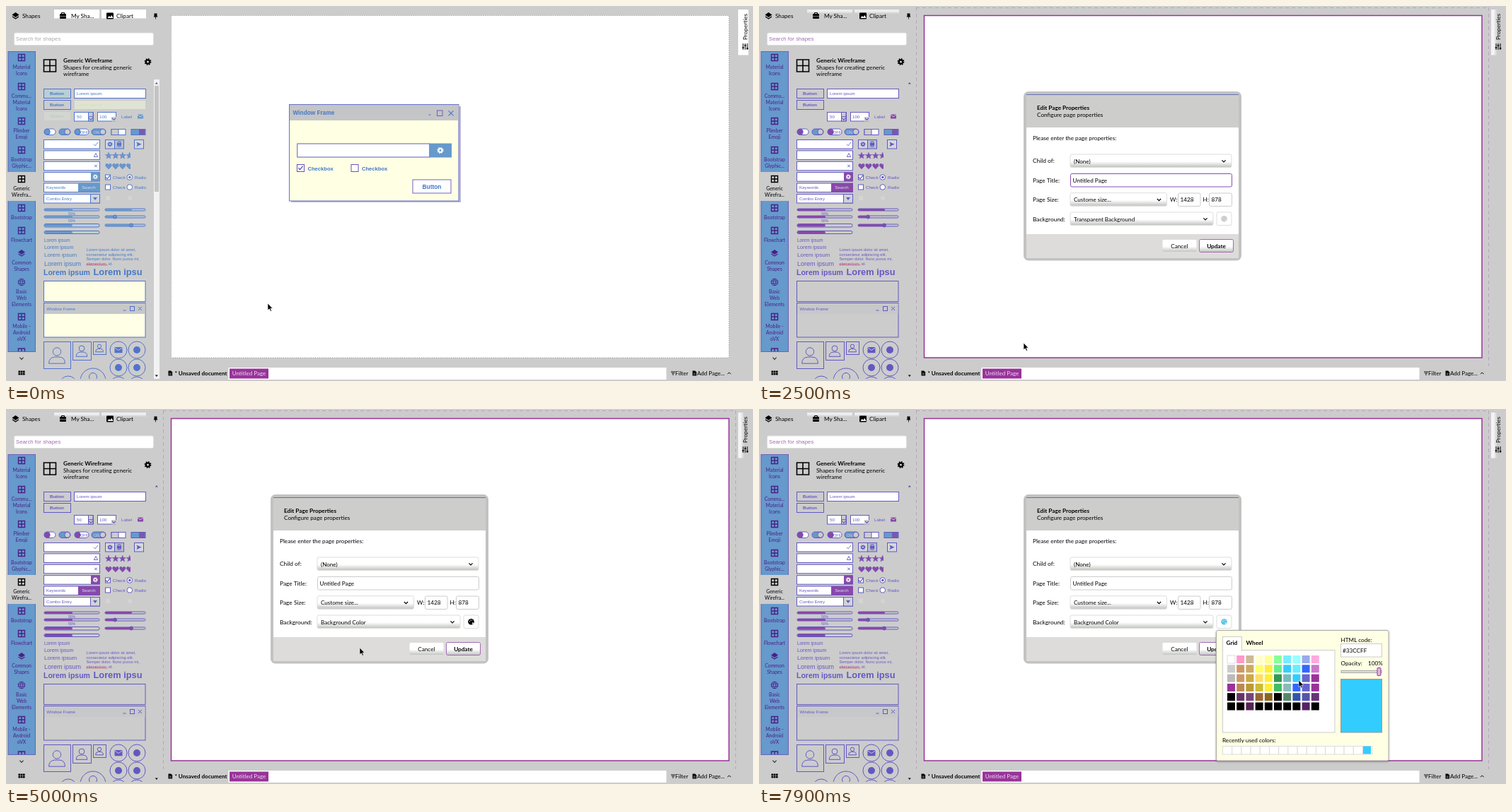
Write an HTML page that moves like this. It is 1056 px wide and 531 px high and loops after 8000 ms.

```html
<!DOCTYPE html>
<html lang="en">
<head>
<meta charset="utf-8">
<title>Page background settings</title>
<style>
html, body { margin: 0; width: 100%; height: 100%; overflow: hidden; background: #ccc; }
svg { display: block; width: 1056px; height: 531px; font-family: Lato, sans-serif;
  --line: #5272cc; --fill: #6699cc; --text: #4478c8; --paper: #ffffe6; --field: #fff;
  --hint: #aaa; --tab: #fff; --side: #fff; --strip: #3d2a90; --edge: #999; --soft: #b9cfd6; }
svg.modal { --line: #6258c2; --fill: #8848aa; --text: #6656c4; --paper: #ccc;
  --hint: #a06cb4; --tab: url(#tabFade); --side: url(#sideFade); --strip: #4c1f86; --edge: #993399; --soft: #ccc; }
text { white-space: pre; }
.arial { font-family: "Liberation Sans", Arial, sans-serif; }
.bold { font-weight: 700; }
.mid { text-anchor: middle; }
.hot rect { fill: #993399 !important; }
.hot text { fill: #e4ccf4 !important; }
</style>
</head>
<body>
<svg id="stage" viewBox="0 0 1056 531"></svg>
<script>
const stage = document.getElementById('stage');
const LINE = 'var(--line)', FILL = 'var(--fill)', TEXT = 'var(--text)', PURPLE = '#993399';

const paint = (fill, stroke, w = 1) => `style="fill:${fill};stroke:${stroke};stroke-width:${w}"`;
const rect = (x, y, w, h, fill = 'none', stroke = 'none', r = 0, more = '') =>
  `<rect x="${x}" y="${y}" width="${w}" height="${h}" rx="${r}" ${paint(fill, stroke)} ${more}/>`;
const path = (d, stroke = '#000', w = 1, fill = 'none', more = '') => `<path d="${d}" ${paint(fill, stroke, w)} ${more}/>`;
const circle = (x, y, r, fill = 'none', stroke = 'none', w = 1, more = '') =>
  `<circle cx="${x}" cy="${y}" r="${r}" ${paint(fill, stroke, w)} ${more}/>`;
const text = (x, y, s, fill = '#000', size = 8.2, cls = '') =>
  `<text x="${x}" y="${y}" class="${cls}" style="fill:${fill};font-size:${size}px">${s}</text>`;
const group = (id, body, more = '') => `<g id="${id}" ${more}>${body}</g>`;
const range = (n, f) => Array.from({ length: n }, (_, i) => f(i)).join('');

// Icons
const gear = (x, y, r, c) => {
  const tooth = r * .85 * Math.PI / 8;
  return circle(x, y, r * .55, 'none', c, r * .45) +
    circle(x, y, r * .85, 'none', c, r * .35, `stroke-dasharray="${tooth}"`);
};
const gridIcon = (x, y, r, c, w = 1) =>
  path(`M${x - r} ${y - r}h${2 * r}v${2 * r}h${-2 * r}zM${x} ${y - r}v${2 * r}M${x - r} ${y}h${2 * r}`, c, w);
const layers = (x, y, c) =>
  path(`M${x} ${y - 5}l5 3.5-5 3.5-5-3.5z`, 'none', 0, c) + path(`M${x - 4.5} ${y + 1}l4.5 3 4.5-3`, c, 1.3);
const globe = (x, y, c) => circle(x, y, 4.7, 'none', c) +
  path(`M${x - 4.5} ${y - 1.6}h9m0 3.2h-9M${x} ${y - 4.5}q-4 4.5 0 9q4-4.5 0-9`, c, .8);
const mail = (x, y, s, c) => rect(x - s, y - s * .75, 2 * s, 1.5 * s, c, 'none', .5) +
  path(`M${x - s} ${y - s * .6}l${s} ${s * .7} ${s}-${s * .7}`, '#ddd', .8);
const down = (x, y, c = '#000') => path(`M${x - 2.6} ${y - 1.3}l2.6 2.6 2.6-2.6`, c, 1.2);
const right = (x, y, c) => path(`M${x - 1.3} ${y - 2.6}l2.6 2.6-2.6 2.6`, c, 1.1);
const cross = (x, y, r, c, w = 1) => path(`M${x - r} ${y - r}l${2 * r} ${2 * r}m0 ${-2 * r}l${-2 * r} ${2 * r}`, c, w);
const check = (x, y, c, w = 1.2) => path(`M${x - 3} ${y}l2 2.4 4-5`, c, w);
const palette = (x, y, c) => circle(x, y, 4.3, c) +
  [[-2, -.6], [-.8, -2.3], [1.2, -2.2]].map(([a, b]) => circle(x + a, y + b, .7, '#ddd')).join('') + circle(x + 2.4, y + 2.2, 1.2, '#ddd');
const page = (x, y) => path(`M${x} ${y}h3.6l2 2v5h-5.6z`, 'none', 0, '#000') + path(`M${x + 1.2} ${y + 3.6}h3.2m-3.2 1.7h3.2`, '#ccc', .6);
const star = (x, y) => path('M' + Array.from({ length: 10 }, (_, i) => {
  const r = i % 2 ? 2 : 4.8, a = (i / 5 - .5) * Math.PI;
  return `${(x + r * Math.cos(a)).toFixed(1)} ${(y + r * Math.sin(a)).toFixed(1)}`;
}).join('L') + 'z', LINE, .5, FILL);
const heart = (x, y) => path(`M${x} ${y + 4}l-4-4.2c-1.3-4 3-4.6 4-1.6 1-3 5.3-2.4 4 1.6z`, LINE, .5, FILL);
const person = (x, y, s) => rect(x + .5, y + .5, s, s, 'none', LINE) +
  circle(x + s / 2, y + s * .38, s * .15, 'none', LINE) +
  path(`M${x + s * .2} ${y + s * .82}q0-${s * .22} ${s * .22}-${s * .24}h${s * .16}q${s * .22} 0 ${s * .22} ${s * .24}z`, LINE);

const small = (x, y, s, cls = '', size = 6.2, fill = TEXT) => text(x, y, s, fill, size, 'arial ' + cls);
const field = (x, y, w, h = 12.5, fill = 'var(--field)') => rect(x + .5, y + .5, w, h, fill, LINE);

function toolbar() {
  return rect(68, 5, 64, 12.5, 'var(--tab)') + rect(135, 5, 63, 12.5, 'var(--tab)') +
    layers(13.5, 14, '#000') + text(23, 17, 'Shapes') +
    rect(76, 11, 9, 7, '#000', 'none', 1) + path('M78.5 11v-1.5h4v1.5', '#000', 1) + path('M76 14.5h9', '#ccc', .6) + text(92, 17, 'My Sha...') +
    rect(142, 9.5, 10, 9, '#000', 'none', 1) + path('M143.5 17l2.3-3 1.6 1.7 2-2.7 2.2 4z', 'none', 0, '#fff') + text(156, 17, 'Clipart') +
    path('M209.5 10.5h4v3.5l1 1.5h-6l1-1.5z', 'none', 0, '#000') + path('M211.5 15v3.5', '#000', .8) +
    rect(11.5, 38, 197, 17.5, '#fff', '#ddd', 2) + text(14, 49, 'Search for shapes', 'var(--hint)', 7.8, 'arial');
}

function categories() {
  const items = [[73, 'Material', 'Icons'], [114, 'Commu...', 'Material', 'Icons'], [163, 'Plimber', 'Emoji'],
    [204, 'Bootstrap', 'Glyphic...'], [245, 'Generic', 'Wirefra...'], [286, 'Bootstrap'], [318, 'Flowchart'],
    [350, 'Common', 'Shapes'], [391, 'Basic', 'Web', 'Elements'], [440, 'Mobile -', 'Android', 'oVX']];
  return rect(3, 64.5, 38.5, 425, '#6699cc', '#6a62b8') + rect(2, 235, 41, 41, '#ccc') +
    items.map(([y, ...lines]) => {
      const c = y === 245 ? '#000' : 'var(--strip)';
      const icon = y === 350 ? layers(22, y, c) : y === 391 ? globe(22, y, c) : gridIcon(22, y, 4.5, c, 1.4);
      return icon + lines.map((s, i) => text(22, y + 16 + i * 9, s, c, 6.9, 'mid')).join('');
    }).join('') + path('M17.5 489v-4h9v4M22 485v4', 'var(--strip)', 1.4) +
    down(22, 499, '#333') + range(6, i => rect(17.5 + i % 3 * 3.2, 516.5 + (i > 2) * 3.2, 2.7, 2.7, '#000'));
}

function shapeList() {
  const pills = [[54, 0, ''], [75, 1, ''], [97, 0, 'OFF'], [121, 1, 'ON']].map(([x, on, s]) => {
    const w = s ? 20 : 16;
    return rect(x, 174, w, 8.5, on ? '#6699cc' : '#fff', LINE, 4.2) + circle(on ? x + w - 4.2 : x + 4.2, 178.2, 4, on ? '#ccc' : FILL, LINE) +
      (s ? small(on ? x + 3 : x + 8, 180.6, s, '', 5.6, on ? '#ccd' : TEXT) : '');
  }).join('');
  const slider = (x, y, w, part, knob) => rect(x, y - 1.5, w, 3, 'var(--soft)', LINE, 1.5) +
    rect(x, y - 1.5, part, 3, FILL, 'none', 1.5) + (knob ? circle(x + part, y, 2.5, FILL, LINE) : '');
  const para = ['Lorem ipsum dolor sit amet,', 'consectetur adipiscing elit.', 'Semper dolor. Nunc purus mi,'];
  return field(53, 117, 38, 13, 'var(--soft)') + small(72, 126, 'Button', 'mid bold') + field(96, 117, 101, 13) + small(100, 126, 'Lorem ipsum') +
    field(53, 133, 38, 13, '#ccc') + small(72, 142, 'Button', 'mid bold') +
    group('faint', rect(97, 134, 100, 12, '#e0e3d3') + small(100, 142, 'Lorem ipsum', '', 6.2, '#d8dcb8') +
      rect(54, 150, 37, 12, '#d2d6d0') + small(72, 158, 'Button', 'mid', 6.2, '#bcc4c4')) +
    field(96, 150, 27) + small(100, 158.5, '50') + rect(116.5, 150.5, 6.5, 12.5, '#ccc', LINE) + path('M116.5 156.7h6.5', LINE) +
    down(119.8, 160, LINE) + field(129, 150, 26) + small(132, 158.5, '100') + rect(149, 157, 7, 6.5, '#ccc') + down(152.5, 160, LINE) +
    small(163, 158.5, 'Label') + mail(190, 156.5, 4, FILL) +
    pills + rect(149, 174.5, 20, 8, '#fff', LINE) + rect(149, 174.5, 10, 8, '#ccc', LINE) + rect(177, 174.5, 20, 8, '#6699cc', LINE) + rect(188, 175, 8.5, 7, '#7a58b0') +
    range(4, i => field(53, 189 + i * 15.4, 79)) + check(127, 195.5, LINE, .8) + path('M127 208.5l2.7 5h-5.4z', LINE, .9) + cross(127, 226.5, 1.7, LINE) +
    rect(120, 235.5, 12.5, 12.5, FILL) + gear(126.3, 241.8, 3.5, '#eee') +
    [140, 153, 181].map(x => rect(x + .5, 189.5, 13, 12.5, x === 153 ? '#b5bccb' : '#d4d8dd', LINE)).join('') +
    gear(147, 195.7, 3.5, LINE) + rect(157, 194, 6, 3.5, LINE) + path('M158.3 194v-2h3.4v2m-3.4 3v2h3.4v-2', LINE) +
    path('M184.5 192.5l7 3.2-7 3.2 1.2-3.2z', 'none', 0, LINE) + circle(174, 195.7, 1, '#bfc4c4') +
    range(4, i => `<g ${i === 3 ? 'clip-path="url(#half)"' : ''}>${star(145 + i * 9.9, 212)}${heart(145 + i * 9.9, 227)}</g>`) +
    [242.5, 256.5].map((y, i) => rect(140.5, y - 3.5, 7, 7, '#fff', LINE) + (i ? '' : check(144, y, LINE)) + small(151, y + 2.5, 'Check') +
      circle(174.8, y, 3.8, '#fff', LINE) + (i ? '' : circle(174.8, y, 1.8, LINE)) + small(182, y + 2.5, 'Radio')).join('') +
    field(53, 250.5, 79) + small(57, 259, 'Keywords') + rect(102, 251, 31, 12.5, FILL) + small(117, 259, 'Search', 'mid', 6.2, '#dde') +
    field(53, 266, 79) + small(57, 274.5, 'Combo Entry') + rect(119.5, 266.5, 13, 12.5, '#d0d4d8', LINE) + path('M123 271h6l-3 4z', 'none', 0, LINE) +
    rect(141, 269, 6, 6, '#d3d5d3') + circle(175, 272, 3, '#d3d5d3') +
    slider(54, 288.5, 78, 40) + slider(54, 298.5, 78, 40) + small(93, 295.7, '50%', 'mid', 5) + small(93, 305.5, '50%', 'mid', 5) +
    rect(54, 308.5, 78, 4.5, 'var(--soft)', LINE, 2) + rect(54, 309, 40, 3.5, FILL, 'none', 2) +
    rect(54, 318.5, 78, 4, 'var(--soft)', LINE, 2) + rect(54, 319, 40, 3, FILL, 'none', 2) +
    slider(140, 288.5, 57, 38) + slider(140, 298.5, 57, 14, 1) + slider(140, 310.5, 57, 37, 1) +
    [[334, 6.3], [344, 7.2], [355, 8], [368, 9]].map(([y, s]) => small(54, y, 'Lorem ipsum', '', s)).join('') +
    small(53, 381, 'Lorem ipsum', 'bold', 10.5) + small(123.5, 381, 'Lorem ipsu', 'bold', 12.8) +
    para.map((s, i) => small(113.5, 347 + i * 6.5, s, '', 5.7)).join('') +
    small(113.5, 366.6, 'elementum', '', 5.7, '#a04a9a') + path('M113.5 366.8h30', '#c55', .7) + small(145, 366.6, 'id.', '', 5.7) +
    field(53, 389, 143.5, 29, 'var(--paper)') + field(53, 420, 143.5, 48.5, 'var(--paper)') + rect(54, 421, 142.5, 15, '#c6c8ca') +
    small(57.5, 431, 'Window Frame', '', 6) + path('M165.5 431h4', LINE) + rect(175.5, 425.5, 6, 6, 'none', LINE) + cross(189.5, 428.5, 2.5, LINE) +
    person(53, 475, 38) + person(94, 475, 26) + person(123, 475, 18) +
    [[159, 487], [185, 487], [159, 512], [185, 512], [159, 537], [185, 537]].map(([x, y]) => circle(x, y, 12, 'none', LINE)).join('') +
    mail(159, 487, 5.5, LINE) + circle(185, 487, 5, LINE) + circle(159, 512, 5, LINE) + circle(185, 512, 5, LINE) +
    circle(88, 536, 12, 'none', LINE) + circle(123, 531, 18, 'none', LINE) + circle(123, 525, 5.5, 'none', LINE);
}

function sidebar() {
  return toolbar() + categories() + gridIcon(62, 84.5, 8.5, '#000', 1.6) +
    text(81, 80, 'Generic Wireframe', '#000', 8.2, 'bold') + text(81, 89.5, 'Shapes for creating generic') + text(81, 99, 'wireframe') +
    gear(200.5, 79, 4.8, '#000') +
    group('scroll', rect(209, 104, 8, 424, '#f2f2f2') + rect(210, 113, 6, 150, '#c4c4c4')) +
    path('M210.8 110.5l2-2.5 2 2.5z', 'none', 0, '#5a4a9a') + path('M210.8 522.5h4l-2 2.5z', 'none', 0, '#000') +
    group('shapes', shapeList(), 'clip-path="url(#panel)"');
}

function workspace() {
  const box = x => rect(x + .5, 224.5, 10, 10, '#fff', '#6b4fc0');
  const frame = rect(403, 142, 240, 136, '#b9b5d8') + rect(400.5, 139.5, 239.5, 136.5, '#ffffe4', '#6673c8') +
    rect(401, 140, 238.5, 22, '#c4c5c6') + small(405.5, 154.3, 'Window Frame', 'bold', 8.3) +
    path('M597.5 154h3', LINE) + rect(609.5, 148, 7.5, 7.5, 'none', '#6b5fc0') + cross(629, 151.8, 3.5, LINE, 1.2) +
    rect(411.8, 195, 187, 19, '#fff', '#5b5fc4') + rect(598.5, 194.5, 31.5, 20, '#6699cc') + gear(614, 204.5, 4.5, '#fff') +
    box(411) + check(416.5, 229.3, '#5b5fc4', 1.4) + box(487.5) + small(426.5, 232.5, 'Checkbox', 'bold', 7.6) + small(503, 232.5, 'Checkbox', 'bold', 7.6) +
    rect(575, 246, 54, 19, '#fff', '#6f62c8') + small(602, 258.8, 'Button', 'mid bold', 8.4);
  return group('outer', path('M222.5 2V510M1031.5 2V510M222 2.5H1031', '#a98ab5', .6, 'none', 'stroke-dasharray="5 4"')) +
    rect(233.5, 13.5, 788.5, 484.5, '#fff', 'var(--edge)', 0, 'id="sheet"') + frame +
    rect(1035, 5, 14.5, 64.5, 'var(--side)') + `<g transform="rotate(-90)">${text(-48, 1047.5, 'Properties')}</g>` +
    path('M1042 53v9m3-9v9m3-9v9', '#000', 1) + path('M1040.7 59h2.6m.4-3h2.6m.4 4h2.6', '#000', 1.4) +
    page(229.5, 516.5) + text(238.5, 523, '* Unsaved document', '#000', 8, 'bold') +
    rect(314.5, 512, 619, 17, '#fff') + rect(316, 513.5, 55, 14, PURPLE) + text(319.7, 523, 'Untitled Page', '#ecdcf8', 8) +
    path('M940 518h6m-5 2h4m-3 2h2', '#000', .9) + text(946, 523, 'Filter', '#000', 8) +
    page(970.5, 516.5) + text(977, 523, 'Add Page...', '#000', 8) + path('M1020 521.2l2.3-2.3 2.3 2.3', '#000', 1);
}

const menuItems = [[369, 'New Child Page...'], [391, 'Duplicate'], [407, 'Delete'], [423, 'Move Left', 1], [439, 'Move Right', 1],
  [455, 'Goto'], [476.5, 'Properties...'], [491.5, 'Export page as PNG...'], [512, 'Edit Page Note...']];

function menu() {
  return rect(342, 359, 136, 164, '#fff', '#bbb', 1, 'filter="url(#shadow)"') +
    menuItems.map(([y, s, off]) => `<g class="item">${rect(344, y - 7.5, 131, 15, '#fff')}${text(364, y + 3, s, off ? '#bbb' : '#000')}` +
      (s[0] === 'E' && y < 500 ? text(448, y + 3, 'Ctrl+E') : '') + '</g>').join('') +
    path('M350 369h6.5M353.2 365.8v6.5', '#555', 1.2) + rect(351, 388, 6, 7.5, 'none', '#000', 1) + path('M349 393v-7h6', '#000') +
    path('M349.5 407h7.5', '#80307f', 1.4) + path('M354 420l-2.5 2.7 2.5 2.7', '#bbb') + right(353, 438.7, '#bbb') + right(465.5, 454.8, '#000');
}

function dialog() {
  const select = (y, w, s, id = '') => rect(440, y, w, 18.5, 'url(#button)', '#ddd', 2, id && `id="${id}"`) +
    text(445, y + 12.5, s, '#000', 8.1, id && id + 'Text') + down(440 + w - 11, y + 9.6);
  const input = (x, y, w, s, id = '') => rect(x + .5, y + .5, w, 18.5, '#fff', '#ccc', 2, id && `id="${id}"`) + text(x + 3.5, y + 12.5, s);
  return rect(374, 121, 308, 239.5, '#c2c2c2', 'none', 7) + rect(378, 125, 300, 232, '#fff') +
    rect(378, 125, 300, 47, '#cdcdcc') + path('M378 125.5h300', '#6670b8') + rect(378, 323, 300, 34, '#dedcda') +
    text(393, 147, 'Edit Page Properties', '#000', 8.2, 'bold') + text(393, 157, 'Configure page properties') +
    text(387, 190, 'Please enter the page properties:') +
    ['Child of:', 'Page Title:', 'Page Size:', 'Background:'].map((s, i) => text(387, 222 + i * 27.5, s, '#000', 8.4)).join('') +
    select(210, 228, '(None)') + input(440, 237, 228, 'Untitled Page', 'pageTitle') + select(264.7, 136.5, 'Custome size...') +
    text(581, 277, 'W:') + input(592, 264.5, 31.5, '1428') + text(627.5, 277, 'H:') + input(636, 264.5, 32, '878') +
    select(292, 202, 'Transparent Background', 'background') + rect(647, 292, 21, 18.5, '#fff', '#ddd', 2, 'id="pick"') +
    group('pickIcon', palette(657.5, 301.3, 'currentColor')) +
    rect(570, 330.5, 49, 18, 'url(#button)', '#ddd', 2) + text(594.3, 342.5, 'Cancel', '#000', 8.2, 'mid') +
    rect(622.5, 330.5, 48, 18, 'url(#button)', '#a06ab4', 2) + text(646.5, 342.5, 'Update', '#000', 8.2, 'mid bold');
}

function options() {
  return rect(439.5, 315.5, 103.5, 33.5, '#ffffe4', '#ccc', 1, 'filter="url(#shadow)"') +
    text(448, 327, 'Transparent Background') + text(448, 341.5, 'Background Color');
}

function colorPopup() {
  const swatches = ['fff f9c cb9 ffc ff9 8f9 7ef 9ff 9ae fad', 'ccc c96 ca6 ff6 fe3 6e8 3cf 6ef 36f c7c', 'bbb c96 ca4 fd6 fe3 395 7bb 3cf 66c 939',
    '939 b85 b93 cb3 fe3 4b6 8bb 36f 66c 939', '000 636 747 963 862 000 586 35a 55a 637', '000 000 525 000 000 000 000 000 526 000'];
  return rect(646.5, 313.5, 243.5, 184.5, '#ffffe4', '#aaa', 2, 'filter="url(#shadow)"') +
    rect(655.5, 341.5, 158.5, 116.5, '#fff', '#ccc') + rect(655.5, 322.5, 27, 20, '#fff', '#ccc') + rect(656, 340, 26, 4, '#fff') +
    text(660.5, 334, 'Grid', '#000', 8.2, 'bold') + text(688.5, 334, 'Wheel', '#000', 8.2, 'bold') +
    swatches.map((row, j) => row.split(' ').map((c, i) => rect(662 + i * 13.2, 349 + j * 13.3, 11, 11, '#' + c, c === 'fff' ? '#ddd' : 'none')).join('')).join('') +
    text(822.5, 330, 'HTML code:') + rect(822.5, 332.5, 58, 18.5, '#fff', '#ccc') + text(825, 345, '#FFFFFF', '#000', 8.2, 'code') +
    text(822.5, 363, 'Opacity:') + text(861, 363, '100%') + rect(823, 370.5, 57, 3, '#ddd', '#aaa') + rect(874, 366.5, 5, 11, '#ddb8dc', PURPLE, 1) +
    rect(822.5, 382.5, 58, 75.5, '#fff', '#999', 0, 'id="sample"') +
    text(655, 471.5, 'Recently used colors:') + range(16, i => rect(655.5 + i * 13.2, 477.5, 13.2, 11.5, '#fff', '#ddd')) +
    rect(854, 477.5, 11, 11, '#33ccff', 'none', 0, 'id="recent"');
}

const pointers = group('cursor',
  group('arrow', path('M0 0v9.8l2.3-2 1.6 3.5 1.6-.7-1.6-3.4h3z', '#fff', .6, '#000')) +
  group('hand', path('M.2 1q.7-1 1.4 0v2.6l3.6.8q1 .5.8 1.8l-.6 2.4h-4l-2.2-3q0-1 1-.6z', '#fff', .3, '#000', 'transform="translate(-1.2 0) scale(1.1)"')));

stage.innerHTML = `<defs>
  <clipPath id="panel"><rect x="45" y="105" width="163" height="423"/></clipPath>
  <clipPath id="half"><rect x="168" y="205" width="8" height="30"/></clipPath>
  <linearGradient id="button" x2="0" y2="1"><stop offset=".55" stop-color="#fff"/><stop offset="1" stop-color="#bfc2bd"/></linearGradient>
  <linearGradient id="tabFade" x2="0" y2="1"><stop offset=".2" stop-color="#eee"/><stop offset=".5" stop-color="#ccc"/></linearGradient>
  <linearGradient id="sideFade"><stop offset=".25" stop-color="#f4f4f4"/><stop offset=".6" stop-color="#ccc"/></linearGradient>
  <filter id="shadow" x="-10%" y="-20%" width="120%" height="140%"><feDropShadow dx="0" dy="1" stdDeviation="1.5" flood-opacity=".35"/></filter>
  </defs>` + rect(0, 0, 1056, 531, '#ccc') + sidebar() + workspace() +
  group('menu', menu()) + group('dialog', dialog()) + group('options', options()) + group('popup', colorPopup()) + pointers;

// Cursor stops: time, x, y
const stops = [[0, 370, 421], [200, 370, 421], [900, 346.5, 524], [1400, 346.5, 524], [2000, 374, 477], [2500, 374, 477], [2900, 432, 446],
  [3600, 561, 302], [4300, 561, 302], [4700, 500, 338], [5000, 500, 338], [5700, 667, 309], [6300, 667, 309], [6900, 763, 384], [8000, 763, 384]];
const at = id => document.getElementById(id);
const show = (id, on) => { at(id).style.display = on ? '' : 'none'; };
const items = [...document.querySelectorAll('.item')];

function cursorAt(t) {
  const i = stops.findIndex(s => s[0] > t);
  const [t0, x0, y0] = stops[i - 1], [t1, x1, y1] = stops[i];
  const p = (t - t0) / (t1 - t0), k = p * p * (3 - 2 * p);
  return [x0 + (x1 - x0) * k, y0 + (y1 - y0) * k];
}

function draw(now) {
  const t = Math.floor(now % 8000 / 100) * 100;
  const [x, y] = cursorAt(t);
  const during = (a, b) => t >= a && t < b;
  const modal = t >= 2500, chosen = t >= 5000, colored = t >= 7100;
  const overSelect = during(3500, 4500), overPick = during(5600, 6400);

  stage.classList.toggle('modal', modal);
  for (const id of ['faint', 'scroll']) show(id, !modal);
  show('outer', modal);
  at('sheet').setAttribute('stroke-dasharray', modal ? 'none' : '1 2');
  at('sheet').style.strokeWidth = modal ? 1.5 : 1;
  show('menu', during(1300, 2500));
  items.forEach((el, i) => el.classList.toggle('hot', Math.abs(menuItems[i][0] - y) < 7.5));
  show('dialog', modal);
  show('options', during(3800, 5000));
  show('popup', t >= 6200);

  at('pageTitle').style.stroke = t < 3700 ? '#8450b0' : '#ccc';
  at('background').style.fill = overSelect ? '#c6c6c6' : 'url(#button)';
  at('background').style.stroke = overSelect ? '#9a8ba6' : '#ddd';
  document.querySelector('.backgroundText').textContent = chosen ? 'Background Color' : 'Transparent Background';
  at('pick').style.fill = overPick ? '#bbb' : '#fff';
  at('pickIcon').style.color = colored ? '#5cc8ea' : chosen ? '#000' : '#ccc';

  document.querySelector('.code').textContent = colored ? '#33CCFF' : '#FFFFFF';
  at('sample').style.fill = colored ? '#33ccff' : '#fff';
  show('recent', colored);

  const hand = during(900, 1400) || overSelect || overPick;
  show('hand', hand);
  show('arrow', !hand);
  at('cursor').setAttribute('transform', `translate(${x.toFixed(1)} ${y.toFixed(1)})`);
}

const start = performance.now();
(function tick() {
  draw(performance.now() - start);
  requestAnimationFrame(tick);
})();
</script>
</body>
</html>
```
